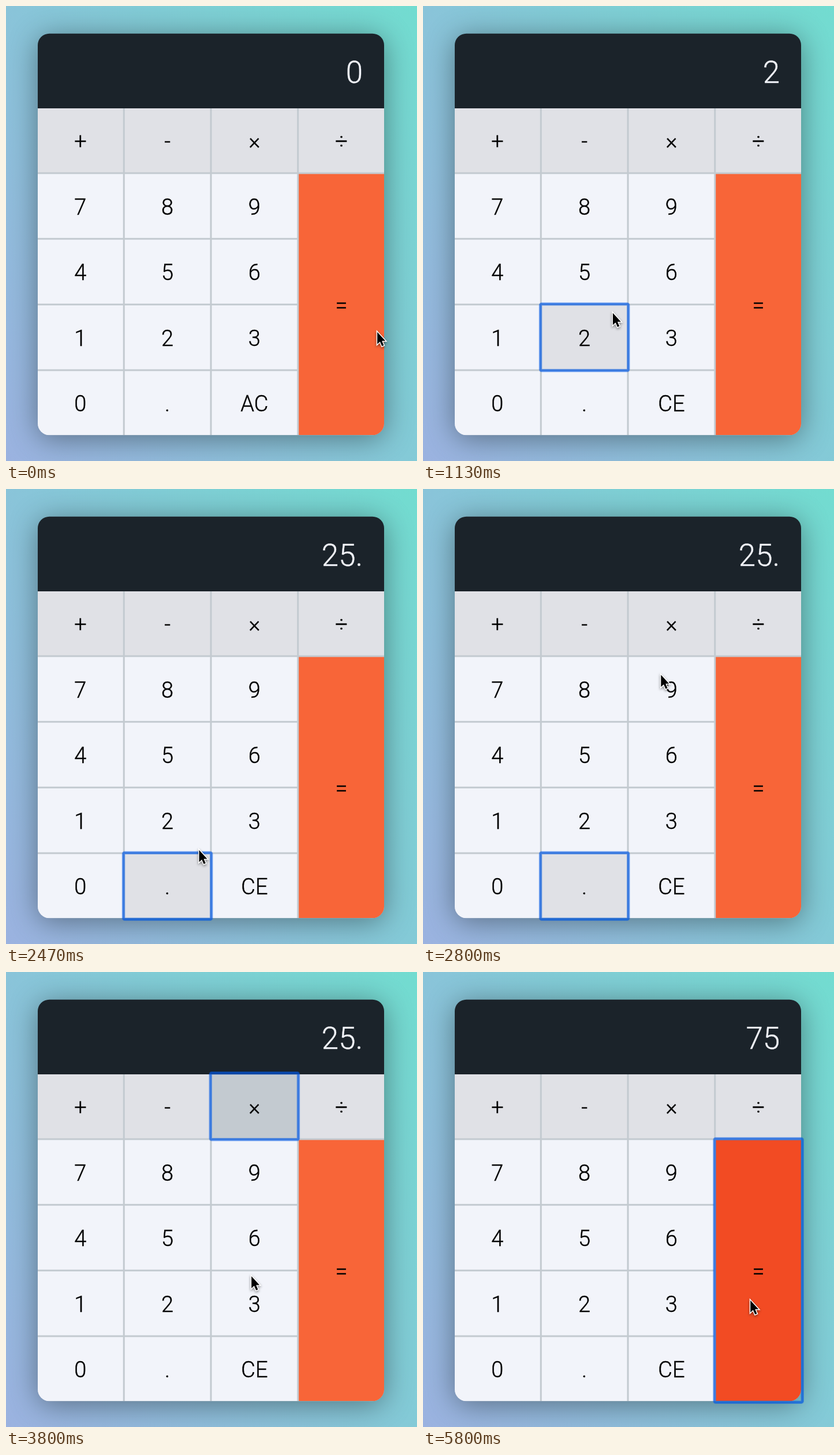
These frames come from a looping animation (712 px wide and 787 px high, 5.87 s). An HTML page with a canvas:

```html
<!DOCTYPE html>
<html lang="en">
<head>
<meta charset="utf-8">
<title>Calculator</title>
<style>
  html, body { margin: 0; width: 100%; height: 100%; overflow: hidden; }
  body { background: linear-gradient(236deg, #72dcd0, #9bb2e0); }
  canvas { display: block; }
</style>
</head>
<body>
<canvas width="712" height="787"></canvas>
<script>
const ctx = document.querySelector('canvas').getContext('2d');
const LOOP = 5870, STEP = 1000 / 15;
const HOLD = 250, SETTLE = 80;
const LIGHT = '#f2f4fa', GREY = '#e0e1e6', LINE = '#c3cad0', DARK = '#1b232a';
const LEFT = 55, TOP = 177, GAP = 3, KEY_W = 147.75, KEY_H = 110.6;

const keys = [...'+-×÷789=456=123=0.A='].map((label, i) => ({
  label,
  x: LEFT + (i % 4) * (KEY_W + GAP),
  y: TOP + (i >> 2) * (KEY_H + GAP),
  h: KEY_H,
  operator: i < 4
})).filter((k, i) => k.label !== '=' || i === 7);
const key = label => keys.find(k => k.label === label);
const equals = key('='), times = key('×'), clear = key('A');
equals.h = 4 * KEY_H + 3 * GAP;

const presses = [
  { at: 720, key: key('2'), x: 334, y: 560, shows: '2' },
  { at: 1400, key: key('5'), x: 320, y: 491, shows: '25' },
  { at: 2050, key: key('.'), x: 316, y: 690, shows: '25.' },
  { at: 3060, key: times, x: 431, y: 242, shows: '25.' },
  { at: 4020, key: key('3'), x: 423, y: 565, shows: '3' },
  { at: 4880, key: equals, x: 561, y: 561, shows: '75' }
];
const stops = [{ at: -HOLD, x: 642, y: 562 }, ...presses, { at: LOOP, x: 566, y: 566 }];

// The pointer eases from each stop to the next and settles before pressing
function pointer(t) {
  const i = stops.findIndex(s => s.at > t), a = stops[i - 1], b = stops[i];
  const leave = a.at + HOLD;
  const u = Math.min(1, Math.max(0, (t - leave) / (b.at - SETTLE - leave)));
  const s = u * u * (3 - 2 * u);
  return [a.x + (b.x - a.x) * s, a.y + (b.y - a.y) * s];
}

function text(str, x, y, size, color, align) {
  ctx.font = `300 ${size}px Roboto, sans-serif`;
  ctx.textAlign = align;
  ctx.fillStyle = ctx.strokeStyle = color;
  ctx.lineWidth = 0.4;
  ctx.fillText(str, x, y);
  ctx.strokeText(str, x, y);
}

function cardPath() {
  ctx.beginPath();
  ctx.roundRect(LEFT, 47.7, 600, 694.5, 20);
}

function drawCard() {
  const split = (TOP - 47) / 700;
  const fill = ctx.createLinearGradient(0, 47, 0, 747);
  fill.addColorStop(split, DARK);
  fill.addColorStop(split, LINE);
  ctx.save();
  ctx.shadowColor = 'rgba(0,0,0,.4)';
  ctx.shadowBlur = 50;
  ctx.shadowOffsetY = 6;
  ctx.fillStyle = fill;
  cardPath();
  ctx.fill();
  ctx.restore();
}

function drawKey(k, fill, label) {
  ctx.save();
  cardPath();
  ctx.clip();
  ctx.fillStyle = fill;
  ctx.fillRect(k.x, k.y, KEY_W, k.h);
  ctx.restore();
  text(label, k.x + KEY_W / 2, k.y + k.h / 2 + 14.6, 38, '#000', 'center');
}

function drawRing(k) {
  const out = 2.2;
  ctx.strokeStyle = 'rgba(0,87,227,.46)';
  for (const width of [5.5, 3.5]) {
    ctx.beginPath();
    ctx.roundRect(k.x - out, k.y - out, KEY_W + 2 * out, k.h + 2 * out, 2);
    ctx.lineWidth = width;
    ctx.stroke();
  }
}

function drawPointer(x, y) {
  const arrow = new Path2D('M0 0V20.8L4.7 16.5L8.1 24.3L11.3 22.9L8 15.3H14Z');
  ctx.save();
  ctx.translate(x + 1.2, y + 2);
  ctx.lineWidth = 3;
  ctx.strokeStyle = '#fff';
  ctx.shadowColor = 'rgba(0,0,0,.45)';
  ctx.shadowBlur = 4;
  ctx.shadowOffsetY = 2;
  ctx.stroke(arrow);
  ctx.shadowColor = 'transparent';
  ctx.fillStyle = '#000';
  ctx.fill(arrow);
  ctx.restore();
}

function drawClick(x, y) {
  ctx.beginPath();
  ctx.arc(x, y + 1, 33, 0, 2 * Math.PI);
  ctx.lineWidth = 2;
  ctx.strokeStyle = '#000';
  ctx.stroke();
}

function draw(t) {
  const [px, py] = pointer(t);
  const last = presses.findLast(p => p.at <= t);
  const done = presses.findLast(p => p.at + HOLD <= t);
  const focus = last?.key, held = last !== done;
  const hover = t > 0 && px >= equals.x;

  const fillOf = k => {
    if (k === equals) return hover ? '#f24b23' : '#f86538';
    if ((held && k === focus) || (k === times && done?.key === times)) return LINE;
    return k.operator || k === focus ? GREY : LIGHT;
  };
  const labelOf = k => k === clear ? (done ? 'CE' : 'AC') : k.label;
  const paint = k => drawKey(k, fillOf(k), labelOf(k));

  ctx.clearRect(0, 0, 712, 787);
  drawCard();
  keys.forEach(paint);
  text(done ? done.shows : '0', 618.2, 133, 53, LIGHT, 'right');

  if (focus) drawRing(focus);
  // A hovered equals key covers its neighbour's ring
  if (hover && focus !== equals) paint(equals);
  if (held) drawClick(px, py);
  drawPointer(px, py);
}

const start = performance.now();
function tick() {
  const t = (performance.now() - start) % LOOP;
  draw(Math.floor((t + 5) / STEP) * STEP);
  requestAnimationFrame(tick);
}
tick();
</script>
</body>
</html>
```
